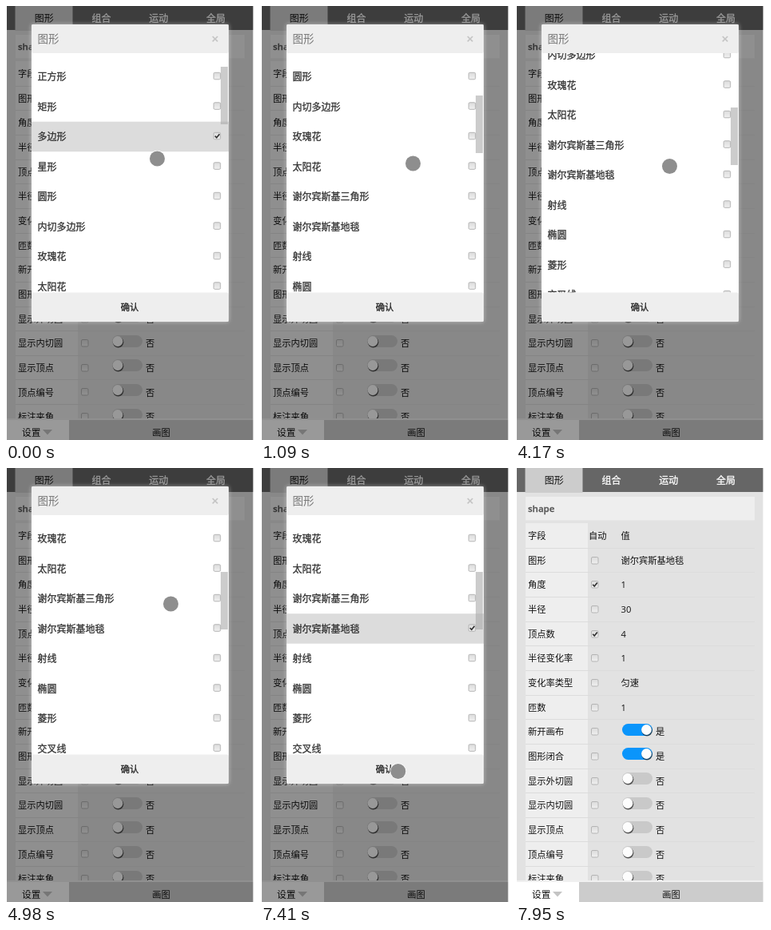
Recreate the animation shown at these times as an HTML page. Size 312 by 543 pixels, loop 8 s.

```html
<!DOCTYPE html>
<html lang="zh-CN">
<head>
<meta charset="utf-8">
<title>图形设置</title>
<style>
html, body { margin: 0; width: 100%; height: 100%; overflow: hidden; background: #fff; }
svg { display: block; width: 312px; height: 543px; }
text { font-family: "Open Sans", "Noto Sans CJK SC", "Noto Sans CJK", sans-serif; white-space: pre; }
</style>
</head>
<body>
<svg id="stage" viewBox="0 0 312 543">
  <defs>
    <clipPath id="pageClip"><rect x="1" y="0" width="309" height="517"/></clipPath>
    <clipPath id="listClip"><rect x="32" y="59" width="247" height="299.5"/></clipPath>
    <filter id="glow" x="-10%" y="-10%" width="120%" height="120%"><feGaussianBlur stdDeviation="2.5"/></filter>
    <filter id="soft" x="-30%" y="-30%" width="160%" height="160%"><feGaussianBlur stdDeviation="0.7"/></filter>
    <linearGradient id="box" x1="0" y1="0" x2="0" y2="1">
      <stop offset="0" stop-color="#dcdcdc"/><stop offset="1" stop-color="#f0f0f0"/>
    </linearGradient>
  </defs>
  <g id="page"></g>
  <g id="dialog"></g>
  <g id="pointer"><circle r="10.2" fill="#fff"/><circle r="9.5" fill="#8e8e8e"/></g>
</svg>
<script>
const LOOP = 8000, ROW = 30.65, ITEM = 37.5;
const $ = id => document.getElementById(id);

function add(parent, tag, attrs, text) {
  const el = document.createElementNS('http://www.w3.org/2000/svg', tag);
  for (const k in attrs) el.setAttribute(k, attrs[k]);
  if (text) el.textContent = text;
  parent.appendChild(el);
  return el;
}
const rect = (p, x, y, width, height, fill, more) =>
  add(p, 'rect', { x, y, width, height, fill, ...more });
// y is the vertical middle of the glyphs
const label = (p, x, y, str, size = 11.25, fill = '#111', more) =>
  add(p, 'text', { x, y: y + size * 0.37, 'font-size': size, fill, ...more }, str);
const bold = color => ({ stroke: color, 'stroke-width': 0.3 });

function checkbox(p, x, y, checked) {
  rect(p, x + 0.5, y + 0.5, 8.5, 8.5, 'url(#box)', { rx: 1.5, stroke: '#b4b4b4' });
  return add(p, 'path', {
    d: `M${x + 2.2} ${y + 4.8}l2 2.2l3.6 -4.6`, fill: 'none', stroke: '#333',
    'stroke-width': 1.7, visibility: checked ? 'inherit' : 'hidden'
  });
}

function toggle(p, y, on) {
  const top = Math.round(y - 7.5), cx = on ? 163.5 : 140;
  rect(p, 133, top, 38, 15, on ? '#0a95fb' : '#c9c9c9', { rx: 7.5 });
  add(p, 'circle', { cx: cx + 0.6, cy: top + 8.6, r: 6.8, fill: '#000', opacity: 0.6, filter: 'url(#soft)' });
  add(p, 'circle', { cx, cy: top + 7.5, r: 6.4, fill: '#fdfdfd' });
  label(p, 175, y + 3, on ? '是' : '否');
}

function buildPage(p) {
  rect(p, 1, 0, 308.5, 543, '#e2e2e2');
  rect(p, 1, 0, 308.5, 30, '#666');
  rect(p, 11.5, 0, 72, 31, '#ccc');
  ['图形', '组合', '运动', '全局'].forEach((t, i) =>
    label(p, 47.7 + i * 71.8, 15.5, t, 12, i ? '#fff' : '#111',
      { 'text-anchor': 'middle', ...(i ? bold('#fff') : {}) }));
  rect(p, 12, 36, 287, 29.5, '#eee');
  label(p, 15, 50.3, 'shape', 11.5, '#555', { 'font-weight': 600, ...bold('#555') });

  const body = add(p, 'g', { 'clip-path': 'url(#pageClip)' });
  rect(body, 12, 69, 78, 460, '#eee');
  const rows = [
    ['图形', '谢尔宾斯基地毯'], ['角度', '1', true], ['半径', '30'], ['顶点数', '4', true],
    ['半径变化率', '1'], ['变化率类型', '匀速'], ['匝数', '1'], ['新开画布', true], ['图形闭合', true],
    ['显示外切圆', false], ['显示内切圆', false], ['显示顶点', false], ['顶点编号', false], ['标注夹角', false]
  ];
  label(body, 15, 85, '字段');
  label(body, 91, 85, '自动');
  label(body, 131.5, 85, '值');
  rows.forEach(([name, value, auto], i) => {
    const y = 85 + ROW * (i + 1);
    rect(body, 12, Math.round(y - 16), 287, 1, '#dcdcdc');
    label(body, 15, y, name);
    checkbox(body, 94, Math.round(y - 5), auto);
    if (typeof value === 'string') label(body, 131.5, y, value);
    else toggle(body, y - 3, value);
  });

  rect(p, 1, 516, 308.5, 2, '#f0f0f0');
  rect(p, 1, 518, 78, 25, '#fff');
  rect(p, 79, 518, 230.5, 25, '#ccc');
  label(p, 20, 533.5, '设置', 11.7);
  add(p, 'path', { d: 'M46 530H58L52 536.5Z', fill: '#c4c4c4' });
  label(p, 194.5, 533.5, '画图', 11.25, '#111', { 'text-anchor': 'middle' });
}

const items = ['正方形', '矩形', '多边形', '星形', '圆形', '内切多边形', '玫瑰花', '太阳花',
  '谢尔宾斯基三角形', '谢尔宾斯基地毯', '射线', '椭圆', '菱形', '交叉线'];

function buildDialog(p) {
  rect(p, 1, 0, 308.5, 543, '#000', { opacity: 0.4 });
  rect(p, 31.5, 22.5, 248, 373, '#fff', { opacity: 0.4, rx: 3, filter: 'url(#glow)' });
  rect(p, 32, 23, 247, 372, '#fff', { rx: 2 });
  const view = add(p, 'g', { 'clip-path': 'url(#listClip)' });
  const list = add(view, 'g', {});
  const mark = rect(list, 32, 0, 247, ITEM, '#dcdcdc');
  const ticks = items.map((name, i) => {
    const y = 88.8 + ITEM * i;
    label(list, 39.5, y, name, 12, '#333', bold('#333'));
    return checkbox(list, 259.7, y - 6);
  });
  const thumb = rect(view, 269, 0, 9, 72, '#aaa', { opacity: 0.6 });
  rect(p, 32, 23, 247, 36, '#eee', { rx: 2 });
  label(p, 39.5, 41, '图形', 13.5, '#777');
  add(p, 'path', { d: 'M258.8 38l6.4 6.4m0 -6.4l-6.4 6.4', stroke: '#c4c4c4', 'stroke-width': 1.6 });
  rect(p, 32, 358.5, 247, 36.5, '#eee', { rx: 2 });
  label(p, 155, 377.3, '确认', 11.25, '#222', { 'text-anchor': 'middle', ...bold('#222') });
  return { list, mark, ticks, thumb };
}

// [time, value...]: each entry holds until the next one
const scrollSteps = [[0, 0], [700, 12], [820, 66.5], [970, 138], [1090, 150], [4170, 214.5], [4320, 225]];
const pointerSteps = [
  [0, 189.5, 191], [430, 189.5, 192], [580, 190, 194], [700, 190.5, 196], [820, 190.5, 197],
  [2360, 192.5, 200.5], [4600, 193, 200.5], [4740, 198, 189], [4860, 203, 177], [4980, 206.5, 170],
  [6070, 207, 171], [6210, 208, 173], [6330, 209, 177], [6480, 210, 187], [6600, 210.3, 196.5],
  [6720, 210.5, 200], [6980, 207, 240], [7100, 182, 348], [7260, 171.8, 379.5],
  [7530, 171, 380], [7680, 167, 390], [7800, 163, 398.5]
];
const held = (steps, t) => steps.filter(s => s[0] <= t).pop();

buildPage($('page'));
const ui = buildDialog($('dialog'));

function draw(t) {
  const scroll = held(scrollSteps, t)[1];
  const [, x, y] = held(pointerSteps, t);
  const chosen = t < 6840 ? 2 : 9;
  ui.list.setAttribute('transform', `translate(0 ${-scroll})`);
  ui.thumb.setAttribute('y', Math.round(75.6 + scroll * 0.24));
  ui.mark.setAttribute('y', 69.7 + ITEM * chosen);
  ui.ticks.forEach((el, i) => el.setAttribute('visibility', i === chosen ? 'inherit' : 'hidden'));
  $('dialog').setAttribute('visibility', t < 7530 ? 'visible' : 'hidden');
  $('pointer').setAttribute('visibility', t < 7950 ? 'visible' : 'hidden');
  $('pointer').setAttribute('transform', `translate(${x} ${y})`);
}

const start = performance.now();
function frame() {
  draw((performance.now() - start) % LOOP);
  requestAnimationFrame(frame);
}
frame();
</script>
</body>
</html>
```
